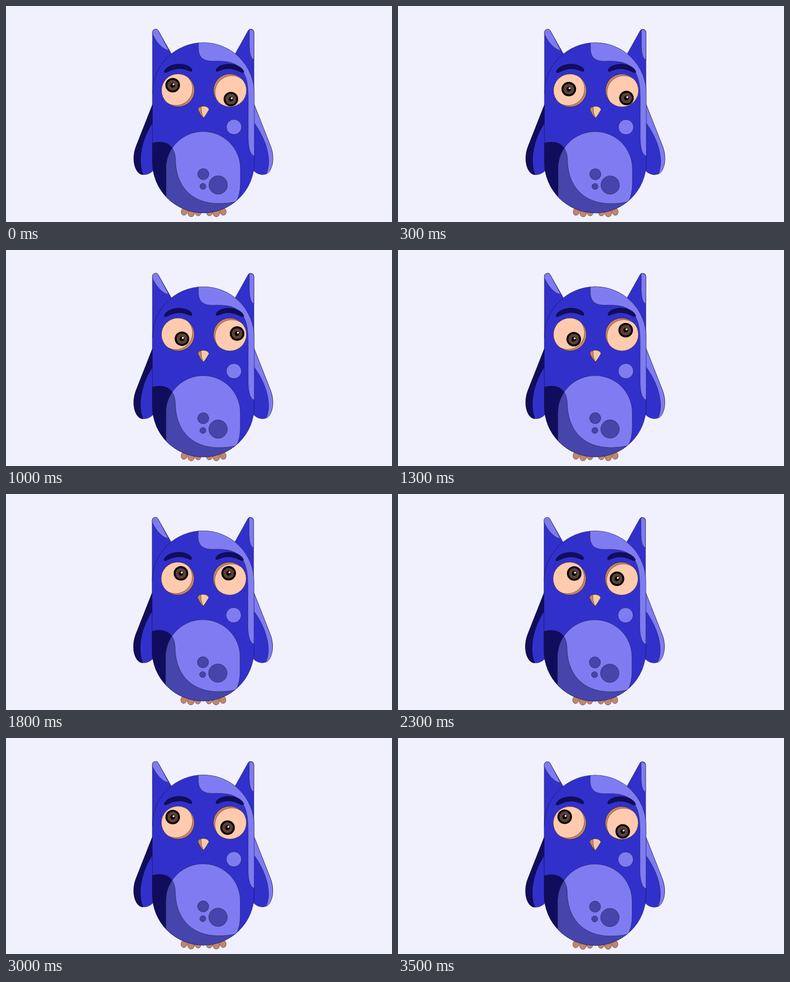
Animation of 690 by 388 pixels, one loop 3.6 s. Source, as an HTML page:

```html
<!DOCTYPE html>
<html lang="en">
<head>
<meta charset="utf-8">
<title>Owl looking around</title>
<style>
html, body { margin: 0; width: 100%; height: 100%; overflow: hidden; background: #f1f1fe; }
svg { display: block; width: 690px; height: 388px; }
.line { stroke: #000; stroke-opacity: .7; stroke-width: .6; stroke-linejoin: round; }
.bare { stroke: none; }
.blue { fill: #3230cb; }
.light { fill: #7f7cf2; }
.dark { fill: #100e5c; }
.shade { fill: #4645ab; }
.skin { fill: #ffcaae; }
.tan { fill: #c78468; }
</style>
</head>
<body>
<svg viewBox="0 0 690 388">
  <defs>
    <rect id="trunk" x="261.700" y="65.700" width="182.200" height="306" rx="91.100"/>
    <path id="belly" d="M286 375V292a66.500 66.500 0 0 1 133 0V318Q419 340 411 352L400 375Z"/>
    <path id="patch" d="M255 249C272 241 301 240 303 275C303 331 342 367 413 351L420 380H255Z"/>
    <path id="wing" d="M262 177L233 251C223 276 231 303 247 303Q256 303 264 295V177Z"/>
    <path id="brow" d="M283 117C287 108 301 103 314 104.500C326 106 334 112 332.500 116.500C331 120 324 113 311 112.500C298 112.500 291 118 286 119.500Q282 120 283 117Z"/>
    <circle id="eye" r="29.500"/>
    <g id="pupil">
      <circle r="13"/>
      <circle r="9.700" fill="#5d4037"/>
      <circle r="4.200"/>
      <circle cx="1.500" cy="-1.500" r="1.800" fill="#fff"/>
    </g>
    <clipPath id="inTrunk"><use href="#trunk"/></clipPath>
    <clipPath id="inBelly"><use href="#belly"/></clipPath>
    <clipPath id="inEye"><use href="#eye"/></clipPath>
  </defs>

  <g id="owl" class="line">
    <g class="tan">
      <ellipse cx="318.700" cy="369" rx="5.500" ry="7" transform="rotate(15 318.700 369)"/>
      <ellipse cx="343" cy="370" rx="5.500" ry="7" transform="rotate(-15 343 370)"/>
      <ellipse cx="331" cy="371.700" rx="6" ry="7"/>
      <ellipse cx="364" cy="370" rx="5.500" ry="7" transform="rotate(15 364 370)"/>
      <ellipse cx="388" cy="369" rx="5.500" ry="7" transform="rotate(-15 388 369)"/>
      <ellipse cx="376" cy="371.700" rx="6" ry="7"/>
    </g>

    <use href="#wing" class="blue"/>
    <path class="dark" d="M262 177L233 251C223 276 231 303 245 303C236 281 240 243 262 210Z"/>
    <g transform="matrix(-1 0 0 1 705.700 0)">
      <use href="#wing" class="blue"/>
      <path class="light" d="M262 177L233 251C224 274 230 299 241 302C230 281 238 243 262 210Z"/>
    </g>

    <path class="blue" d="M261.800 157V47.500A5.700 5.700 0 0 1 272.600 44.800L297 88V157Z"/>
    <path class="light" d="M261.800 50C265 58 277 78 291 79.500L272.600 44.800A5.700 5.700 0 0 0 261.800 47.500Z"/>
    <path class="blue" d="M443.300 157V47.500A5.700 5.700 0 0 0 432.500 44.800L408.500 88V157Z"/>
    <path class="light" d="M434.800 43C436 62 432 92 443.300 96.500V47.500A5.700 5.700 0 0 0 434.800 43Z"/>

    <use href="#trunk" class="blue bare"/>
    <g clip-path="url(#inTrunk)">
      <path class="light" d="M344 60V75C344 92 352 99 370 99C405 98 433 102 433 162V235Q433 269 446 270V60Z"/>
      <use href="#patch" class="dark"/>
      <use href="#belly" class="light bare"/>
      <use href="#patch" class="shade" clip-path="url(#inBelly)"/>
      <use href="#belly" fill="none"/>
    </g>
    <use href="#trunk" fill="none"/>

    <circle class="light" cx="407.500" cy="217.300" r="13.500"/>
    <g class="shade">
      <circle cx="352.700" cy="302" r="10"/>
      <circle cx="379.300" cy="321.500" r="16.500"/>
      <circle cx="352.100" cy="324" r="5.400"/>
    </g>
    <use href="#brow" class="dark"/>
    <use href="#brow" class="dark" transform="matrix(-1 0 0 1 708 0)"/>
    <g transform="translate(307.500 151.600)">
      <use href="#eye" class="tan bare"/>
      <circle class="skin" cx="-3.800" cy="-3" r="30" clip-path="url(#inEye)"/>
      <use href="#eye" fill="none"/>
    </g>
    <g transform="translate(400.400 151.600)">
      <use href="#eye" class="tan bare"/>
      <circle class="skin" cx="3.200" cy="3.500" r="30" clip-path="url(#inEye)"/>
      <use href="#eye" fill="none"/>
    </g>
    <path fill="#f6c9a4" d="M343 186C345 178 361 178 363 186Q358 195 353 201.500Q347 195 343 186Z"/>
    <path class="tan" d="M343 186Q344 181 349 180.500Q348 191 353 201.500Q347 195 343 186Z"/>
  </g>
  <use id="left" href="#pupil"/>
  <use id="right" href="#pupil"/>
</svg>
<script>
const LOOP = 3600, STEP = 100;
const times = [0, 700, 1300, 1800, 2300, 3000, 3500, LOOP];
const tracks = {
  left: [[298, 142.3], [315, 158.6], [314.2, 160.2], [312.7, 142.6], [315, 142.7], [298, 142], [298, 141.5], [298, 142.3]],
  right: [[402, 167.3], [413.3, 158.5], [407, 144], [398, 142.3], [391.5, 152.3], [396, 161], [401.7, 167.7], [402, 167.3]],
  owl: [[0, 0], [0, .3], [-.2, .1], [-.6, .3], [-.8, .5], [-.2, .5], [-.5, 1], [0, 0]]
};
const mix = (a, b, k) => a + (b - a) * k;

// The right pupil swings on a ring; the other parts move straight.
const hub = [402.5, 155];
function swing(a, b, k) {
  const polar = ([x, y]) => [Math.atan2(y - hub[1], x - hub[0]), Math.hypot(x - hub[0], y - hub[1])];
  const [a0, r0] = polar(a), [a1, r1] = polar(b);
  const turn = Math.atan2(Math.sin(a1 - a0), Math.cos(a1 - a0));
  const angle = a0 + turn * k, r = mix(r0, r1, k);
  return [hub[0] + r * Math.cos(angle), hub[1] + r * Math.sin(angle)];
}
const straight = (a, b, k) => [mix(a[0], b[0], k), mix(a[1], b[1], k)];

function draw(now) {
  const t = Math.floor(now % LOOP / STEP) * STEP;
  const i = times.findIndex(end => end > t) - 1;
  const k = (t - times[i]) / (times[i + 1] - times[i]);
  for (const id in tracks) {
    const move = id === "right" ? swing : straight;
    const [x, y] = move(tracks[id][i], tracks[id][i + 1], k);
    document.getElementById(id).setAttribute("transform", `translate(${x} ${y})`);
  }
}

const start = performance.now();
function tick() {
  draw(performance.now() - start);
  requestAnimationFrame(tick);
}
tick();
</script>
</body>
</html>
```
